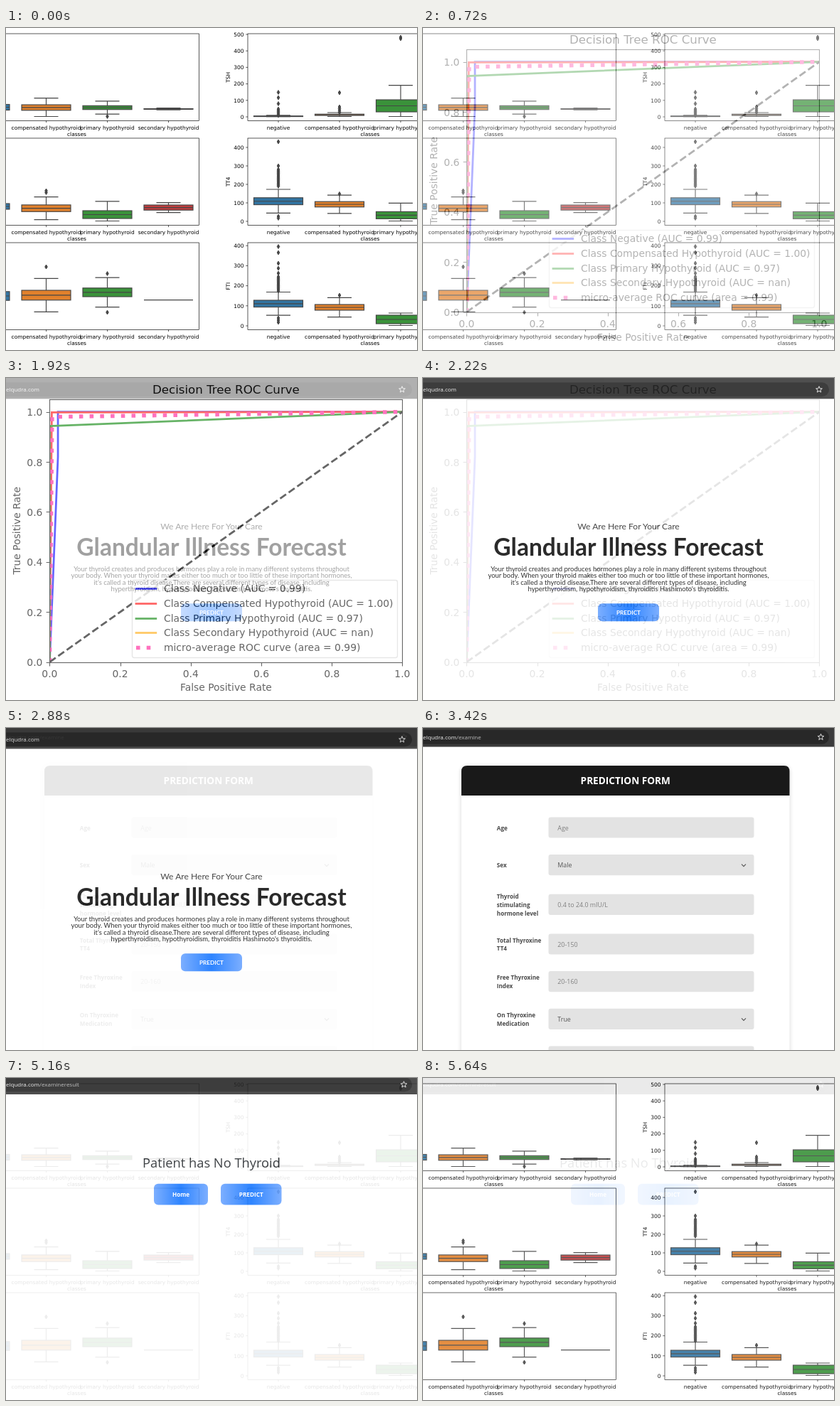
Write an HTML page that moves like this. It is 578 px wide and 453 px high and loops after 5700 ms.

```html
<!DOCTYPE html>
<html lang="en">
<head>
<meta charset="utf-8">
<title>Slides</title>
<style>
html, body { margin: 0; width: 100%; height: 100%; overflow: hidden; background: #fff; }
.slide { position: absolute; left: 0; top: 0; width: 578px; height: 453px; background: #fff; overflow: hidden; }
.fade { opacity: 0; animation: show 5700ms infinite; }
#roc { animation-delay: 598ms; }
#home { animation-delay: 1738ms; }
#form { animation-delay: 2878ms; }
#result { animation-name: showAndLeave; animation-delay: 4018ms; }
/* ten 60 ms steps in; hidden again once the next slide covers it */
@keyframes show {
  0% { opacity: 0; animation-timing-function: steps(10, start); }
  10.5263% { opacity: 1; animation-timing-function: step-end; }
  40%, 100% { opacity: 0; }
}
@keyframes showAndLeave {
  0% { opacity: 0; animation-timing-function: steps(10, start); }
  10.5263% { opacity: 1; animation-timing-function: step-end; }
  20% { opacity: 1; animation-timing-function: steps(10, start); }
  30.5263%, 100% { opacity: 0; }
}
.plot { font-family: "DejaVu Sans", sans-serif; }
.lato { font-family: Lato, sans-serif; }
.ui { font-family: "Open Sans", "Noto Sans", sans-serif; }
.bold { font-weight: 700; }
</style>
</head>
<body>
<svg class="slide plot" id="boxes" viewBox="0 0 578 453" font-size="7.46"></svg>
<svg class="slide fade plot" id="roc" viewBox="0 0 578 453" font-size="13.89"></svg>
<svg class="slide fade lato" id="home" viewBox="0 0 578 453"></svg>
<svg class="slide fade ui" id="form" viewBox="0 0 578 453"></svg>
<svg class="slide fade ui" id="result" viewBox="0 0 578 453"></svg>

<script>
const put = (id, parts) => { document.getElementById(id).innerHTML = parts.join(""); };
const text = (x, y, s, attrs = "") => `<text x="${x}" y="${y}" ${attrs}>${s}</text>`;
const mid = (x, y, s, attrs = "") => text(x, y, s, `text-anchor="middle" ${attrs}`);
const end = (x, y, s) => text(x, y, s, 'text-anchor="end"');
const path = (d, attrs) => `<path d="${d}" fill="none" ${attrs}/>`;
const rect = (x, y, w, h, attrs) => `<rect x="${x}" y="${y}" width="${w}" height="${h}" ${attrs}/>`;
const turned = (x, y, s) => mid(0, 0, s, `transform="translate(${x} ${y}) rotate(-90)"`);

// ---- box plots ----
const INK = "#454545", FRAME = 'stroke="#000" stroke-width="0.65"';
const KINDS = [
  ["negative", "#3274a1"],
  ["compensated hypothyroid", "#e1812c"],
  ["primary hypothyroid", "#3a923a"],
  ["secondary hypothyroid", "#c03d3e"]
];
const STEP = 86, HEIGHT = 122.5;
const rowTop = row => 8 + 147 * row;
const column = (from, to, gap = 1.8) =>
  Array.from({ length: Math.floor((to - from) / gap) + 1 }, (_, i) => from + i * gap);

// whiskers follow from the box height and stop at the zero line
function box(cx, fill, floor, [centre, half, fliers = [], reach = 3.4 * half]) {
  const line = `stroke="${INK}" stroke-width="1.15"`;
  const high = centre - reach, low = Math.max(Math.min(centre + reach, floor), centre + half);
  const marks = fliers.map(y => `M${cx} ${y - 3}l1.8 3l-1.8 3l-1.8 -3z`).join("");
  return rect(cx - 34.5, centre - half, 69, 2 * half, `fill="${fill}" ${line}`) +
    path(`M${cx} ${high}V${centre - half}M${cx} ${centre + half}V${low}` +
      `M${cx - 17} ${high}h34M${cx - 17} ${low}h34M${cx - 34.5} ${centre}h69`, line) +
    `<path d="${marks}" fill="${INK}" stroke="${INK}" stroke-width="0.9"/>`;
}

function panel(left, row, boxes) {
  const top = rowTop(row), bottom = top + HEIGHT, first = left + STEP / 2;
  return [
    ...boxes.map((b, i) => box(first + STEP * i, KINDS[i][1], bottom - 6, b)),
    rect(left, top, 4 * STEP, HEIGHT, `fill="none" ${FRAME}`),
    ...KINDS.map(([name], i) => path(`M${first + STEP * i} ${bottom}v2.6`, FRAME) +
      mid(first + STEP * i, bottom + 12, name)),
    mid(left + 2 * STEP, bottom + 21.8, "classes")
  ].join("");
}

function scale(label, row, step, count) {
  const zero = rowTop(row) + HEIGHT - 5.5;
  const marks = Array.from({ length: count }, (_, i) =>
    path(`M340 ${zero - step * i}h-2.6`, FRAME) + end(334.5, zero - step * i + 2.8, 100 * i));
  return turned(315, rowTop(row) + HEIGHT / 2, label) + marks.join("");
}

// each box: centre, half height, outliers, whisker reach
const LEFT = -72.5, RIGHT = 340;
put("boxes", [
  panel(LEFT, 0, [[111.5, 4], [111.9, 3.9], [112, 2.7, [124.4]], [113.9, 0.4]]),
  panel(LEFT, 1, [[251, 4], [253.6, 4.7, [229, 231.5]], [262.5, 5.5], [252.6, 3.6, [], 7]]),
  panel(LEFT, 2, [[377, 6.2], [375.9, 6.9, [336]], [371.9, 6.1, [345.5, 400]], [382.6, 0]]),
  panel(RIGHT, 0, [
    [124.2, 0.4, [90.5, 98, 106.5, ...column(114, 123)]],
    [122.1, 0.9, [91, ...column(111, 120, 2.6)]],
    [109.5, 8.5, [13, 15]]]),
  panel(RIGHT, 1, [
    [243.7, 4.9, [160, 194, ...column(199, 224), 265, 267.5]],
    [248, 3.8, [233.4]],
    [263.4, 5]]),
  panel(RIGHT, 2, [
    [387.8, 4.8, [307.5, 316, ...column(331, 347, 7), ...column(350, 370), ...column(408, 415, 3)]],
    [393, 4, [376]],
    [410, 6, [], 9]]),
  scale("TSH", 0, 23.2, 6),
  scale("TT4", 1, 26, 5),
  scale("FTI", 2, 28.2, 5)
]);

// ---- ROC curve ----
const X = v => 61.4 + 496 * v, Y = v => 399.6 - 352 * v;
const snap = v => Math.round(v) + 0.5;
const THIN = 'stroke="#000" stroke-width="1.11"', DOTS = "5.56 9.17";
const curve = (pts, color, width = 2.78, dash = "none") =>
  path("M" + pts.map(([x, y]) => `${X(x)} ${Y(y)}`).join("L"),
    `stroke="${color}" stroke-width="${width}" stroke-dasharray="${dash}"`);

const ticks = Array.from({ length: 6 }, (_, i) => {
  const v = i / 5, s = v.toFixed(1);
  return path(`M${snap(X(v))} 400.5v4.9M61.5 ${snap(Y(v))}h-4.9`, THIN) +
    mid(X(v), 421, s) + end(51.4, Math.round(Y(v) + 5.5), s);
});
const legend = [
  ["Class Negative (AUC = 0.99)", "blue"],
  ["Class Compensated Hypothyroid (AUC = 1.00)", "red"],
  ["Class Primary Hypothyroid (AUC = 0.97)", "green"],
  ["Class Secondary Hypothyroid (AUC = nan)", "orange"],
  ["micro-average ROC curve (area = 0.99)", "deeppink"]
].map(([label, color], i) => {
  const base = Math.round(301.4 + 20.6 * i);
  const style = color === "deeppink"
    ? `stroke-width="5.56" stroke-dasharray="${DOTS}"`
    : 'stroke-width="2.78" stroke-linecap="square"';
  return path(`M183 ${base - 4.5}h27.8`, `stroke="${color}" ${style}`) + text(222, base, label);
});

put("roc", [
  '<clipPath id="axes"><rect x="61" y="30" width="496.5" height="370.5"/></clipPath>',
  '<g clip-path="url(#axes)">',
  curve([[0, 0], [0.0235, 0.82], [0.0235, 1], [1, 1]], "blue"),
  curve([[0, 0], [0.006, 0.998], [1, 1]], "red"),
  curve([[0, 0], [0, 0.943], [1, 1]], "green"),
  curve([[0, 0], [0.007, 0.98], [1, 1]], "deeppink", 5.56, DOTS),
  curve([[0, 0], [1, 1]], "#000", 2.78, "10.28 4.44"),
  "</g>",
  rect(61.5, 30.5, 496, 370, `fill="none" ${THIN}`),
  ...ticks,
  rect(177.5, 284.5, 373, 109, 'rx="2.8" fill="#fff" fill-opacity="0.8" stroke="#ccc" stroke-opacity="0.8" stroke-width="1.39"'),
  ...legend,
  mid(309.4, 22, "Decision Tree ROC Curve", 'font-size="16.67"'),
  mid(309.4, 440, "False Positive Rate"),
  turned(20, 214.8, "True Positive Rate")
]);

// ---- web pages ----
function star(cx, cy) {
  const pts = Array.from({ length: 10 }, (_, i) => {
    const r = i % 2 ? 2 : 4.6, a = Math.PI * (i / 5 - 0.5);
    return `${cx + r * Math.cos(a)} ${cy + r * Math.sin(a)}`;
  });
  return path(`M${pts.join("L")}z`, 'stroke="#ddd" stroke-width="1"');
}
const addressBar = (height, cy, starX, page = "") =>
  rect(0, 0, 578, height, 'fill="#3b3b3b"') +
  rect(-30, cy - 10, 601, 20, 'rx="10" fill="#282828"') +
  text(-4, cy + 3, `velqudra.com<tspan fill="#bbb">${page}</tspan>`, 'class="ui" font-size="8" fill="#eee"') +
  star(starX, cy);

const glow = id => `<linearGradient id="${id}"><stop offset="0" stop-color="#6ea6ff"/>` +
  '<stop offset="0.5" stop-color="#1777ff"/><stop offset="1" stop-color="#6ea6ff"/></linearGradient>';
const button = (x, y, w, h, label, fill) =>
  rect(x, y, w, h, `rx="6" fill="url(#${fill})"`) +
  mid(x + w / 2, y + h / 2 + 3, label, 'font-size="8.2" fill="#fff" class="bold"');

const intro = [
  "Your thyroid creates and produces hormones play a role in many different systems throughout",
  "your body. When your thyroid makes either too much or too little of these important hormones,",
  "it's called a thyroid disease.There are several different types of disease, including",
  "hyperthyroidism, hypothyroidism, thyroiditis Hashimoto's thyroiditis."
];
put("home", [
  glow("glowHome"),
  addressBar(29.3, 16.3, 557),
  mid(289, 213, "We Are Here For Your Care", 'font-size="12.1" fill="#333"'),
  mid(289, 250, "Glandular Illness Forecast", 'font-size="33.5" fill="#141414" class="bold"'),
  ...intro.map((s, i) => mid(289, 272 + 9.35 * i, s, 'font-size="9.47" fill="#1c1c1c"')),
  button(246, 317.3, 86, 25, "PREDICT", "glowHome")
]);

const LINE = 11.7, INPUT = 29.2, GAP = 23.5;
const fields = [
  ["Age", "Age"],
  ["Sex", "Male", true],
  ["Thyroid|stimulating|hormone level", "0.4 to 24.0 mIU/L"],
  ["Total Thyroxine|TT4", "20-150"],
  ["Free Thyroxine|Index", "20-160"],
  ["On Thyroxine|Medication", "True", true],
  ["On Antithyroid|Medication", "True", true]
];
let flow = 125.4;
const rows = fields.map(([label, value, picks]) => {
  const lines = label.split("|"), height = Math.max(INPUT, lines.length * LINE);
  const y = flow + height / 2;
  flow += height + GAP;
  return lines.map((s, i) => text(103.8, y + 3.6 + LINE * (i - (lines.length - 1) / 2), s,
    'font-size="8.15" fill="#484848" class="bold"')).join("") +
    rect(176.5, y - INPUT / 2, 289, INPUT, 'rx="3" fill="#e3e3e3"') +
    text(189.3, y + 3.6, value, `font-size="8.9" fill="${picks ? "#555" : "#808080"}"`) +
    (picks ? path(`M448 ${y - 1}l3 3l3 -3`, 'stroke="#555" stroke-width="1.1"') : "");
});

put("form", [
  '<filter id="soft" x="-5%" y="-5%" width="110%" height="110%"><feGaussianBlur stdDeviation="3"/></filter>',
  rect(54, 54, 461.5, 430, 'rx="8" opacity="0.16" filter="url(#soft)"'),
  rect(54, 53, 461.5, 430, 'rx="8" fill="#fff"'),
  path("M54 95V61q0 -8 8 -8H507.5q8 0 8 8V95z", 'style="fill:#191919"'),
  mid(284.7, 79.3, "PREDICTION FORM", 'font-size="13.6" fill="#fff" class="bold"'),
  ...rows,
  addressBar(26.5, 12.8, 559.5, "/examine")
]);

put("result", [
  glow("glowResult"),
  addressBar(23, 9.3, 559.5, "/examineresult"),
  mid(289, 126.2, "Patient has No Thyroid", 'font-size="18.3" font-weight="500" fill="#2b2f33"'),
  button(208, 148.8, 76, 29.6, "Home", "glowResult"),
  button(302, 148.8, 85.5, 29.6, "PREDICT", "glowResult")
]);
</script>
</body>
</html>
```
